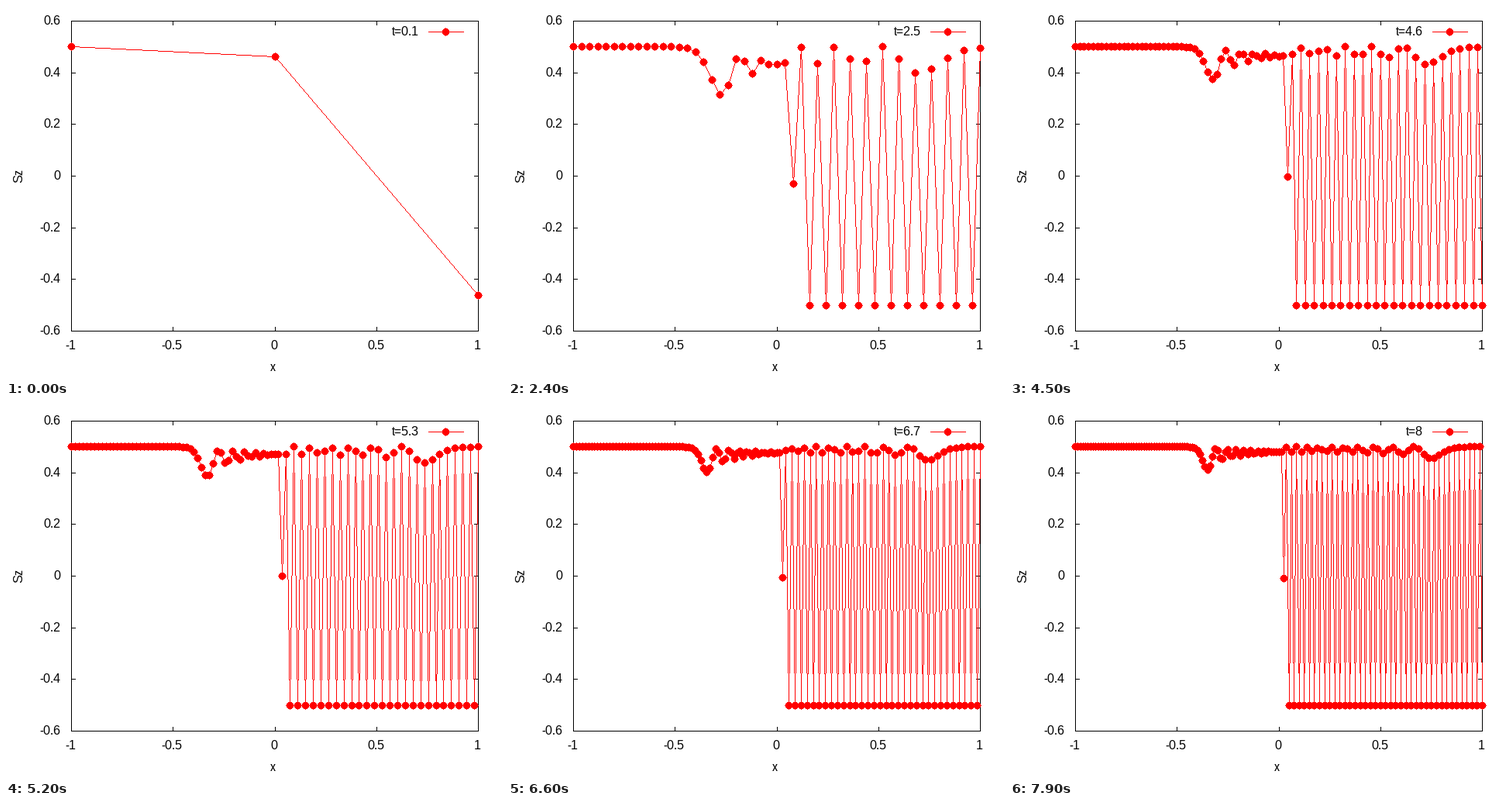
Write a matplotlib script that moves like this. It is 640x480 px and loops after 8 s.

```python
import numpy as np
import matplotlib.pyplot as plt
from matplotlib.animation import FuncAnimation
from matplotlib.collections import PolyCollection

W, H, DPI = 640, 480, 80
LEFT, RIGHT, TOP, BOTTOM = 84, 609, 19, 419
FRAMES = 80
FONT_SIZE = 16 * 72 / DPI          # 16 pixels
RED = "#ff0000"

plt.rcParams.update({"font.family": "Liberation Sans",
                     "text.hinting": "default",
                     "text.hinting_factor": 1})

fig = plt.figure(figsize=(W / DPI, H / DPI), dpi=DPI, facecolor="white")
ax = fig.add_axes([0, 0, 1, 1])
ax.set(xlim=(0, W), ylim=(H, 0))
ax.axis("off")


def px(x):
    return np.floor(LEFT + (np.asarray(x) + 1) * (RIGHT - LEFT) / 2 + 0.5)


def py(s):
    return np.floor(TOP + (0.6 - np.asarray(s)) * (BOTTOM - TOP) / 1.2 + 0.5)


def fill(shapes, color, z):
    """Hard-edged shapes without outlines."""
    group = PolyCollection(shapes, facecolors=color, linewidths=0,
                           antialiaseds=False, zorder=z)
    ax.add_collection(group, autolim=False)
    return group


def segment(x0, y0, x1, y1):
    """A one-pixel line as straight runs of whole pixels."""
    steep = abs(y1 - y0) > abs(x1 - x0)
    ends = [(y0, x0), (y1, x1)] if steep else [(x0, y0), (x1, y1)]
    (u0, v0), (u1, v1) = sorted(ends)
    k = np.arange(u1 - u0 + 1)
    rise = np.floor(abs(v1 - v0) * k / max(u1 - u0, 1) + 0.5)
    v = v0 + np.sign(v1 - v0) * rise
    cut = np.flatnonzero(np.diff(v)) + 1
    first = np.r_[0, cut]
    a, b, c = u0 + first, u0 + np.r_[cut, k.size], v[first]
    runs = np.stack([np.stack([a, b, b, a], 1),
                     np.stack([c, c, c + 1, c + 1], 1)], 2)
    return runs[:, :, ::-1] if steep else runs


def polyline(xs, ys):
    return np.concatenate([segment(*p) for p in zip(xs, ys, xs[1:], ys[1:])])


def label(x, y, s, ha="center", **kw):
    return ax.text(x, y, s, ha=ha, va="baseline", fontsize=FONT_SIZE, **kw)


# Pixel outline of the round marker: one quarter, turned four times
quarter = np.array([(5.5, .5), (4.5, .5), (4.5, 2.5), (3.5, 2.5), (3.5, 3.5),
                    (2.5, 3.5), (2.5, 4.5), (.5, 4.5), (.5, 5.5)])
turn = np.array([(0, 1), (-1, 0)])
DOT = np.vstack([quarter @ np.linalg.matrix_power(turn, k) for k in range(4)])


def dots(xs, ys):
    centres = np.column_stack([xs, ys]) + 0.5
    return centres[:, None, :] + DOT


def bessel(m, z):
    """J_m(z) from its integral over one period."""
    a = np.arange(512) * 2 * np.pi / 512
    return np.cos(np.outer(m, a) - z * np.sin(a)).mean(axis=1)


def spins(n, t):
    """Spin profile at the sites n: a down pair spreading from the junction."""
    p = bessel(np.arange(n.max() + 4), 4 * t) ** 2
    s = np.full(n.size, -0.5)
    wall = n <= 1
    s[wall] = 0.5 - p[1 - n[wall]] - p[2 - n[wall]]
    s[n == 2] = -p[0] / 2
    odd = (n >= 3) & (n % 2 == 1)
    s[odd] = 0.5 - p[(n[odd] - 1) // 2]
    return s


# Frame, ticks and labels
frame = [polyline([LEFT, RIGHT, RIGHT, LEFT, LEFT],
                  [TOP, TOP, BOTTOM, BOTTOM, TOP])]
for v in (-1, -0.5, 0, 0.5, 1):
    x = px(v)
    frame += [segment(x, BOTTOM, x, BOTTOM - 5), segment(x, TOP, x, TOP + 5)]
    label(x - 1, 443, f"{v:g}")
for k in range(-3, 4):
    y = py(k / 5)
    frame += [segment(LEFT, y, LEFT + 5, y), segment(RIGHT, y, RIGHT - 5, y)]
    label(70, y + 5, f"{k / 5:g}", "right")
fill(np.concatenate(frame), "black", 1)
label(344, 471, "x")
label(21, 219, "Sz", rotation=90, rotation_mode="anchor")

# Key
time_text = label(533, 38, "", "right")
fill(segment(545, 33, 590, 33), RED, 3)
fill(dots([567], [33]), RED, 4)

curve = fill([], RED, 3)
points = fill([], RED, 4)


def update(i):
    size = i + 1
    n = np.arange(-size, size + 1)
    x, y = px(n / size), py(spins(n, size / 10))
    curve.set_verts(polyline(x, y))
    points.set_verts(dots(x, y))
    time_text.set_text(f"t={size / 10:g}")
    return curve, points, time_text


anim = FuncAnimation(fig, update, frames=FRAMES, interval=100, repeat=True,
                     repeat_delay=0, blit=False)
plt.show()
```
